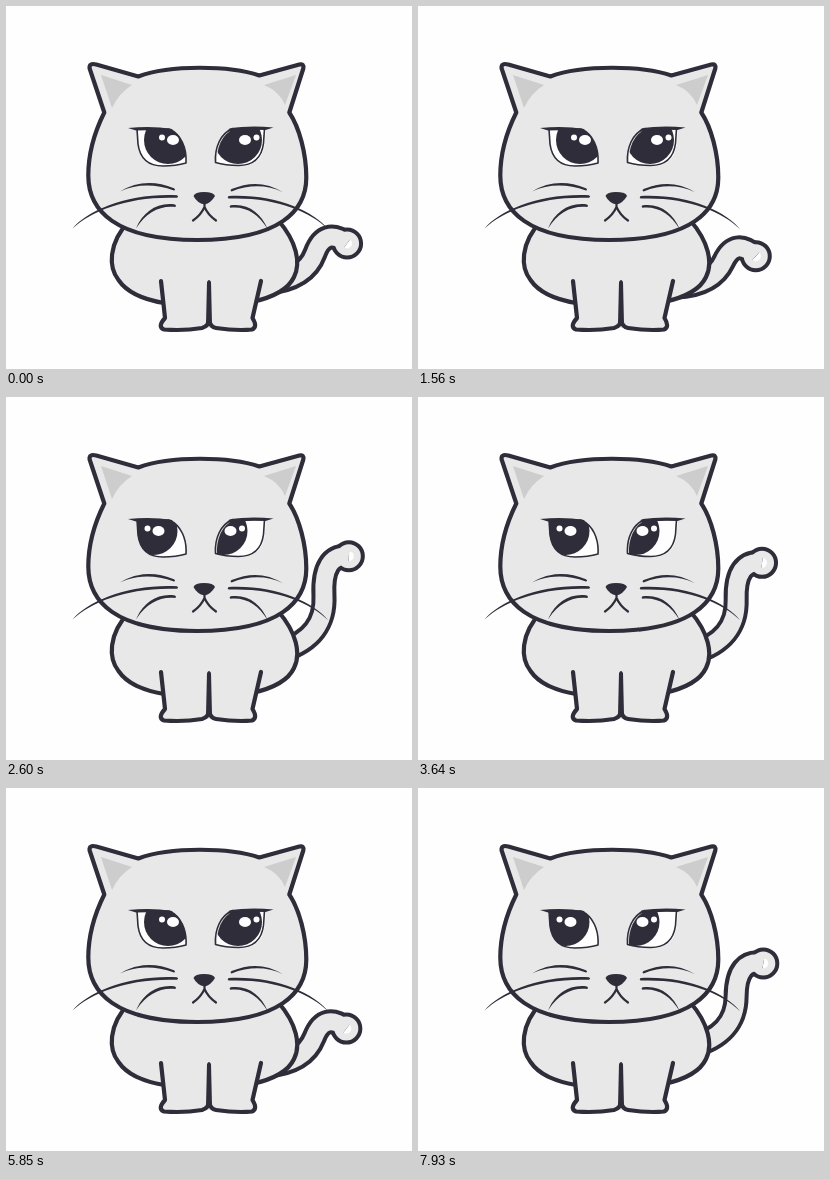
Write an HTML page that moves like this. It is 406x363 px and loops after 8000 ms.

```html
<!DOCTYPE html>
<html lang="en">
<head>
<meta charset="utf-8">
<title>Cat</title>
<style>
  html, body { margin: 0; width: 100%; height: 100%; overflow: hidden; background: #fefefe; }
  svg { display: block; width: 406px; height: 363px; }
  .line { stroke: #2e2d39; stroke-width: 4.2; stroke-linecap: round; stroke-linejoin: round; fill: none; }
  .fur { fill: #e8e8e8; }
  .ink { fill: #2e2d39; }
  .ear { fill: #cdcdcd; }
  .white { fill: #fefefe; }
  .thin { stroke-width: 1.6; }
  .tail { fill: none; stroke: #2e2d39; stroke-width: 25; }
  .tail.inner { stroke: #e8e8e8; stroke-width: 17; }
</style>
</head>
<body>
<svg viewBox="0 0 406 363">
  <defs>
    <g id="tail"><path id="spine"/><circle id="tip" r="3.5"/></g>
    <path id="eye" d="M131 123L132 138C134 153 142 160 157 160Q170 160 180 157C181 142 175 128 163 123Z"/>
    <path id="lid" d="M122 122Q146 119.500 166 123L168 126Q150 123.500 130 124.500Z"/>
    <clipPath id="left"><use href="#eye"/></clipPath>
    <clipPath id="right"><use href="#eye" transform="translate(391) scale(-1 1)"/></clipPath>
    <g id="whiskers" class="ink">
      <path d="M114 185.500Q139 170.500 168 182.300Q170 184 168 184.600Q139 174 114 185.500Z"/>
      <path d="M66.500 222.500C82 204 122 187 171 189.200Q173 190.500 171 191.800C124 190 86 204 66.500 222.500Z"/>
      <path d="M130 222.500C137 206 151 196 169 198.500Q171 200 169 201C153 199.500 140 207 130 222.500Z"/>
    </g>
  </defs>

  <use href="#tail" class="tail"/>
  <use href="#tail" class="tail inner"/>

  <path class="line fur" d="M158 297C140 294 122 288 112.500 274C103 262 101 238 124 214H272C291 236 295 257 288 271C282 284 264 292 246 296"/>
  <path class="fur" d="M155 275L159 312Q152 322 158 324Q178 325 196 322H210Q230 325 246 324Q252 322 246.500 312L255 275Z"/>
  <path class="line" d="M155 275L159 312Q151 321 158 323.500Q178 325 196 322Q203 320 203 313Q204 321 210 322Q230 325 246 323.500Q252 321 246.500 312L255 275"/>
  <path class="ink" d="M201 276Q203 272 205 276L206 318Q203 322 200 318Z"/>

  <path class="line fur" transform="translate(-.7 -.5)" d="M86 59Q83 60 85 65L99 107C90 125 83 148 83 170C83 205 110 234.500 192 234.500C275 234.500 301 205 301 172C301 148 294 122 284 107L298 63Q299 58 294 59L254 70C225 60 165 59 133 71L91 59Q87 58 86 59Z"/>
  <path class="ear" d="M95 69L126 79Q113 87 106 102Z"/>
  <path class="ear" d="M290 69L258 79Q273 85 279 99Z"/>

  <g clip-path="url(#left)">
    <use href="#eye" class="white"/>
    <g class="pupil">
      <circle class="ink" cx="162" cy="134" r="24"/>
      <circle class="white" cx="156" cy="131.500" r="3"/>
      <ellipse class="white" cx="167" cy="134" rx="6" ry="5"/>
    </g>
  </g>
  <g clip-path="url(#right)">
    <use href="#eye" class="white" transform="translate(391) scale(-1 1)"/>
    <g class="pupil">
      <circle class="ink" cx="232" cy="134" r="24"/>
      <circle class="white" cx="250.500" cy="131.500" r="3"/>
      <ellipse class="white" cx="239" cy="134" rx="6" ry="5"/>
    </g>
  </g>
  <g id="frame">
    <use href="#eye" class="line thin"/>
    <use href="#lid" class="ink"/>
  </g>
  <use href="#frame" transform="translate(389.500 -.5) scale(-1 1)"/>

  <use href="#whiskers"/>
  <use href="#whiskers" transform="translate(385.500 .8) scale(-.952 1)"/>

  <path class="ink" d="M187.500 190Q189 186 198 186Q207.500 186 209 190Q205 197 198.500 198.500Q191 197 187.500 190Z"/>
  <path class="line" style="stroke-width:2.2" d="M198.500 197V201Q195 209 187 214.500M198.500 201Q202 209 210 214.500"/>
</svg>
<script>
const LOOP = 8000, SWAY = 4160, LOWEST = 860, HOLD = 2.5;
// Spine of the tail: root, two bends, tip
const raised = [[276, 254], [320, 240], [316, 158], [343, 160]];
const lowered = [[256, 283], [292, 282], [316, 236], [336, 256]];
const spine = document.getElementById('spine');
const tip = document.getElementById('tip');
const pupils = document.querySelectorAll('.pupil');

const mix = (a, b, q) => a.map((v, i) => v + (b[i] - v) * q);

// 0 raised, 1 lowered, lingering at both ends
function sway(t) {
  const wave = Math.cos(2 * Math.PI * (t - LOWEST) / SWAY);
  return 0.5 + 0.515 * Math.tanh(HOLD * wave) / Math.tanh(HOLD);
}

function drawTail(q) {
  const [root, a, b, end] = raised.map((p, i) => {
    const [x, y] = mix(p, lowered[i], q);
    return [x + 28 * q * (1 - q) * Math.max(0, x - 260) / 90, y];
  });
  spine.setAttribute('d', `M${root}Q${a} ${mix(a, b, 0.5)}Q${b} ${end}`);
  tip.setAttribute('transform', `translate(${end})`);
}

function ease(t, from, to) {
  const u = Math.min(1, Math.max(0, (t - from) / (to - from)));
  return u * u * (3 - 2 * u);
}

function draw() {
  const t = performance.now() % LOOP;
  drawTail(sway(t));
  const look = ease(t, 1690, 2080) - ease(t, 3900, 4300) + ease(t, 6700, 7100);
  for (const p of pupils) p.setAttribute('transform', `translate(${-14.5 * look})`);
  requestAnimationFrame(draw);
}
draw();
</script>
</body>
</html>
```
